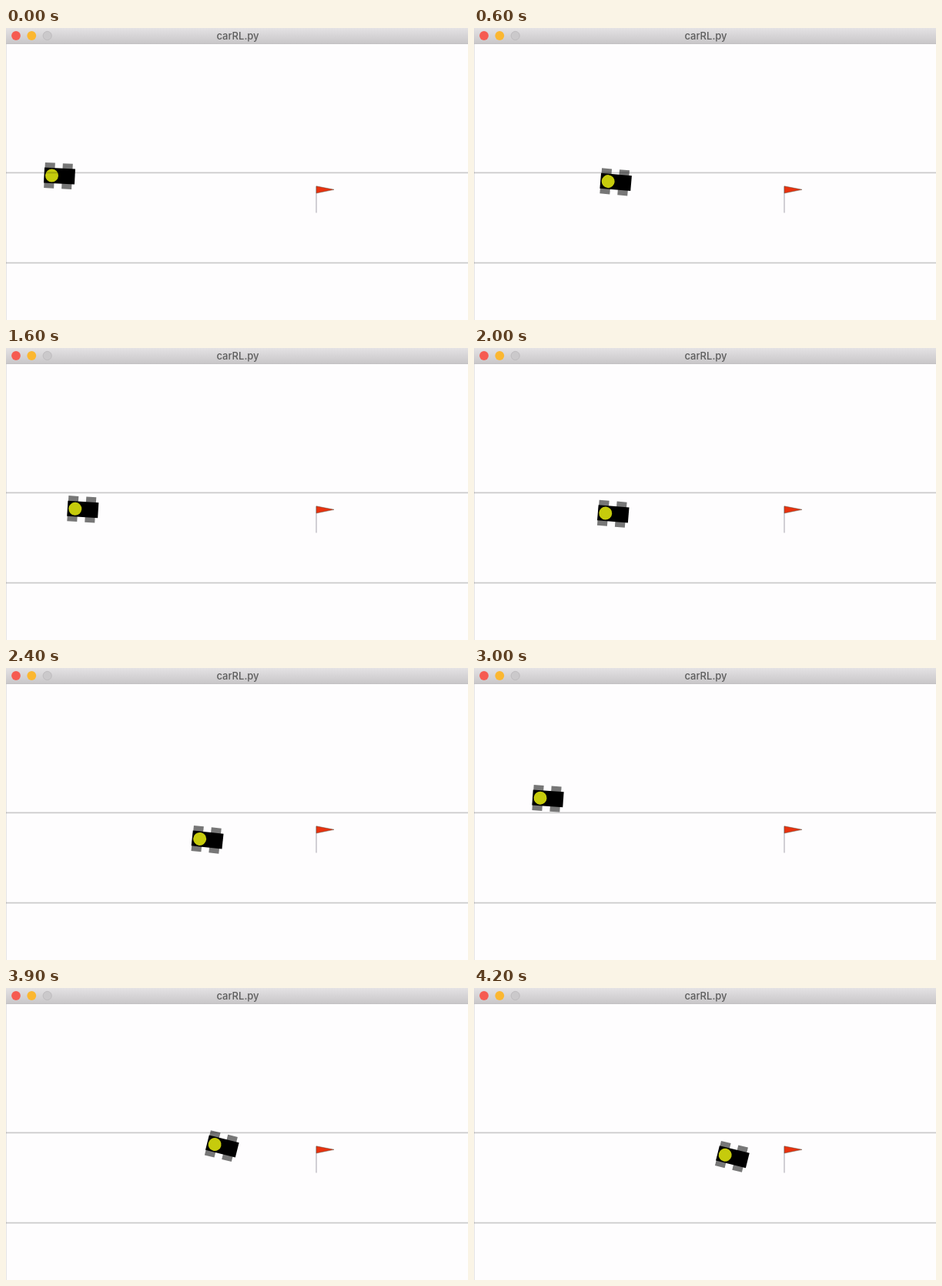
An HTML page for the animation above (4.3 s loop, 600 px wide and 380 px high).

```html
<!DOCTYPE html>
<html lang="en">
<head>
<meta charset="utf-8">
<title>carRL.py</title>
<style>
  html, body { margin: 0; width: 100%; height: 100%; overflow: hidden; background: #fefdfe; }
  svg { display: block; }
  text { font: 500 13px Inter, sans-serif; fill: #5c5c5c; text-anchor: middle; }
  .soft { filter: blur(.45px); }
</style>
</head>
<body>
<svg width="600" height="380" viewBox="0 0 600 380">
  <defs>
    <linearGradient id="bar" x2="0" y2="1">
      <stop stop-color="#e4e2e4"/>
      <stop offset="1" stop-color="#c9c7c9"/>
    </linearGradient>
  </defs>
  <rect width="600" height="380" fill="#fefdfe"/>
  <path d="M.5 21V380" stroke="#e6e5e6"/>

  <rect width="600" height="20" fill="url(#bar)"/>
  <path d="M0 20.4H600" stroke="#bcbabc"/>
  <g class="soft">
    <circle cx="13" cy="10" r="5.9" fill="#f65b51"/>
    <circle cx="33.3" cy="10" r="5.9" fill="#fbb731"/>
    <circle cx="53.7" cy="10" r="5.6" fill="#cbc9cb" stroke="#b9b7b9" stroke-width=".8"/>
    <text x="301" y="14.5">carRL.py</text>
  </g>

  <!-- The car's origin is the centre of its yellow disc. -->
  <g class="soft">
    <g id="car">
      <path fill="#777" d="M-9.5-16.6h13v33.2h-13zM13.5-16.6h13v33.2h-13z"/>
      <path d="M-10-10h40v20h-40z"/>
      <circle r="8.5" fill="#c6cb0c"/>
    </g>
  </g>

  <path d="M0 188.3H600M0 305.6H600" stroke="#000" stroke-opacity=".2" stroke-width="1.7"/>
  <g class="soft">
    <path d="M403 206V240.5" stroke="#a3a1ab"/>
    <path d="M403 205.8L426 210.3L403 215z" fill="#e8320f" stroke="#5b5140" stroke-width=".5"/>
  </g>
</svg>
<script>
  const STEP = 100, STEPS = 43;
  const PULL_AWAY = 2, SLOW = .75, MAX_HEADING = 14;

  // Headings in degrees; speed, turn and drag are per step.
  const drives = [
    { start: 0, x: 59.5, y: 192, heading: 3, turn: .3, speed: 20.9, drag: 0 },
    { start: 14, x: 59.4, y: 207.6, heading: 3, turn: .3, speed: 20.3, drag: 0 },
    { start: 28, x: 51.8, y: 168.6, heading: 0, turn: 2, speed: 23, drag: .34 }
  ];
  const car = document.getElementById("car");

  // Steer the car from the start of its drive up to the given step.
  function pose(step) {
    let { start, x, y, heading, turn, speed, drag } = drives.findLast(d => d.start <= step);
    for (let n = 0; n < step - start; n++) {
      const angle = heading * Math.PI / 180;
      const distance = n < PULL_AWAY ? speed * SLOW : speed;
      x += distance * Math.cos(angle);
      y += distance * Math.sin(angle);
      heading = Math.min(MAX_HEADING, heading + turn);
      speed -= drag;
    }
    return { x, y, heading };
  }

  function draw() {
    const { x, y, heading } = pose(Math.floor(performance.now() / STEP) % STEPS);
    car.setAttribute("transform", `translate(${x} ${y}) rotate(${heading})`);
    requestAnimationFrame(draw);
  }
  draw();
</script>
</body>
</html>
```
